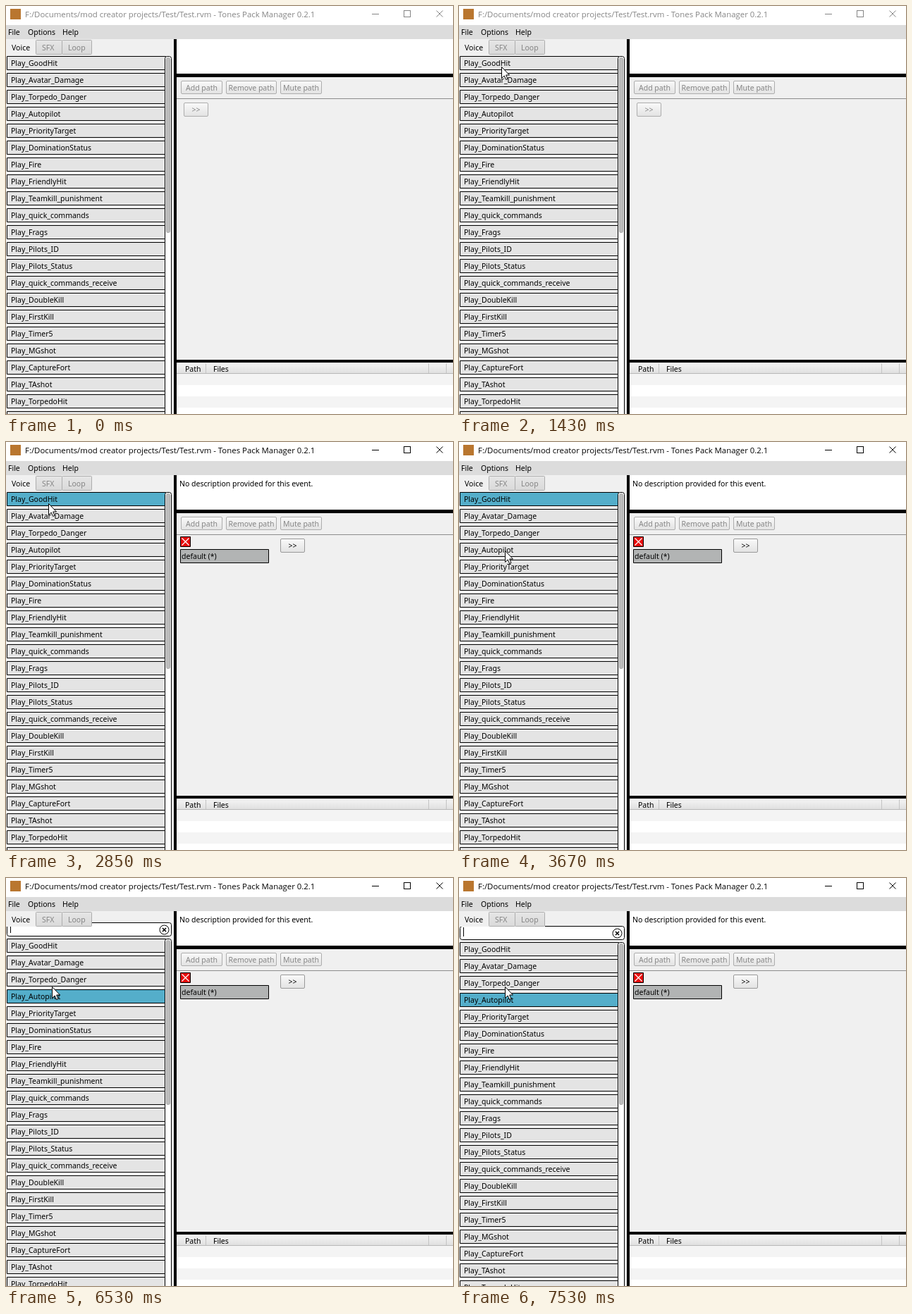
Animation, 634 px wide and 579 px high, one loop 8 s. Source, as an HTML page with a canvas:

```html
<!DOCTYPE html>
<html lang="en">
<head>
<meta charset="utf-8">
<style>
html, body { margin: 0; width: 100%; height: 100%; overflow: hidden; background: #fff; }
canvas { display: block; }
</style>
</head>
<body>
<canvas id="stage" width="634" height="579"></canvas>
<script>
const W = 634, H = 579, LOOP = 8000;
const ctx = document.getElementById('stage').getContext('2d');
const UI = '10.5px "Noto Sans", "Open Sans", sans-serif';
const TITLE = '11.4px "Open Sans", "Noto Sans", sans-serif';
const PANEL = '#f0f0f0', DIM = '#858585';
const EVENTS = ['GoodHit', 'Avatar_Damage', 'Torpedo_Danger', 'Autopilot', 'PriorityTarget',
  'DominationStatus', 'Fire', 'FriendlyHit', 'Teamkill_punishment', 'quick_commands', 'Frags',
  'Pilots_ID', 'Pilots_Status', 'quick_commands_receive', 'DoubleKill', 'FirstKill', 'Timer5',
  'MGshot', 'CaptureFort', 'TAshot', 'TorpedoHit', ''];

// Pointer samples: time, x, y. Each holds until the next one.
const POINTER = [
  [200, 533, 569], [390, 463, 520], [610, 363, 466], [810, 273, 401], [1030, 156, 281],
  [1230, 74, 153], [1430, 60, 86], [1630, 60, 80], [2850, 60, 87], [3050, 63, 106],
  [3270, 64, 128], [3450, 65, 150], [3670, 65, 154]
];

function box(x, y, w, h, color) {
  ctx.fillStyle = color;
  ctx.fillRect(x, y, w, h);
}

function frame(x, y, w, h, fill, stroke, radius = 0) {
  ctx.beginPath();
  ctx.roundRect(x + 0.5, y + 0.5, w - 1, h - 1, radius);
  ctx.fillStyle = fill;
  ctx.fill();
  ctx.lineWidth = 1;
  ctx.strokeStyle = stroke;
  ctx.stroke();
}

function label(text, x, y, color = '#000', font = UI) {
  ctx.font = font;
  ctx.fillStyle = color;
  ctx.fillText(text, x, y);
}

function cross(x, y, size, color, width = 1) {
  ctx.beginPath();
  ctx.moveTo(x, y);
  ctx.lineTo(x + size, y + size);
  ctx.moveTo(x + size, y);
  ctx.lineTo(x, y + size);
  ctx.lineWidth = width;
  ctx.strokeStyle = color;
  ctx.stroke();
}

function shade(y, h, from, to) {
  const g = ctx.createLinearGradient(0, y, 0, y + h);
  g.addColorStop(0, from);
  g.addColorStop(1, to);
  return g;
}

function button(text, x, y, w, h, color = DIM) {
  frame(x, y, w, h, shade(y, h, '#fafafa', '#e2e2e2'), color === DIM ? '#adadad' : '#999', 1.5);
  ctx.textAlign = 'center';
  label(text, x + w / 2, y + h / 2 + 4, color);
  ctx.textAlign = 'left';
}

function drawTitleBar(active) {
  const ink = active ? '#000' : '#858585';
  box(0, 0, W, 27, '#fff');
  box(6, 4, 15, 15, '#b9762f');
  label('F:/Documents/mod creator projects/Test/Test.rvm - Tones Pack Manager 0.2.1', 27, 16, ink, TITLE);
  box(519, 11, 10, 1, ink);
  ctx.lineWidth = 1;
  ctx.strokeStyle = ink;
  ctx.strokeRect(564.5, 6.5, 9, 9);
  cross(610.5, 6.5, 9, ink);
  box(0, 27, W, 20, '#dcdcdc');
  label('File', 3, 41);
  label('Options', 31, 41);
  label('Help', 80, 41);
}

function drawSearch(y, caret) {
  frame(1, y, 234, 20, '#fff', '#000', 3);
  ctx.beginPath();
  ctx.arc(224.5, y + 10.5, 6.5, 0, Math.PI * 2);
  ctx.lineWidth = 1;
  ctx.strokeStyle = '#000';
  ctx.stroke();
  cross(222, y + 8, 5, '#000', 1.6);
  if (caret) box(6, y + 2, 1, 13, '#000');
}

function drawTabs() {
  box(0, 47, 122, 22, PANEL);
  for (const [text, x, w] of [['SFX', 42, 38], ['Loop', 79, 43]]) {
    frame(x, 48, w, 21, shade(48, 21, '#e6e6e6', '#d9d9d9'), '#adadad', 1);
    label(text, x + 9, 63, DIM);
  }
  label('Voice', 8, 63);
}

function drawList(selected, offset, caret) {
  box(0, 47, 238, H - 47, PANEL);
  if (offset) drawSearch(48 + offset, caret);
  drawTabs();
  const top = 71 + offset;
  EVENTS.forEach((name, i) => {
    const y = top + i * 24;
    frame(1, y, 226, 20, i === selected ? '#54aeca' : '#e4e4e4', '#000');
    label('Play_' + name, 7, y + 14);
  });
  frame(225, top, 10, H + 8 - top, '#fff', '#000', 3);
  frame(227, top + 2, 6, 322 - top - 2, '#bcbcbc', '#a6a6a6', 2);
}

function drawDetails(open) {
  box(242, 47, W - 242, 49, '#fff');
  box(242, 101, W - 242, 401, PANEL);
  box(238, 47, 4, H - 47, '#000');
  box(238, 96, W - 238, 5, '#000');
  box(238, 502, W - 238, 4, '#000');
  button('Add path', 248, 106, 59, 19);
  button('Remove path', 312, 106, 72, 19);
  button('Mute path', 389, 106, 59, 19);
  box(242, 131, W - 242, 1, '#8c8c8c');
  if (!open) {
    button('>>', 252, 137, 35, 20);
    return;
  }
  label('No description provided for this event.', 246, 63);
  frame(247, 134, 15, 15, '#e80c0c', '#000');
  cross(249.5, 136.5, 10, '#fff', 1.2);
  frame(247, 152, 126, 20, '#b2b4b4', '#000');
  label('default (*)', 249, 166);
  button('>>', 389, 137, 35, 20, '#000');
}

function drawTable() {
  box(242, 506, W - 242, 16, shade(506, 16, '#f6f6f6', '#dedede'));
  box(242, 521, W - 242, 1, '#b8b8b8');
  for (const x of [283, 599, 624]) box(x, 507, 1, 14, '#c4c4c4');
  label('Path', 254, 519);
  label('Files', 294, 519);
  for (let i = 0; i < 4; i++) box(242, 522 + i * 16, W - 242, 16, i % 2 ? '#fff' : '#f4f4f4');
}

function drawPointer(t) {
  const at = POINTER.findLast(p => t >= p[0]);
  if (!at) return;
  ctx.save();
  ctx.translate(at[1] + 0.5, at[2] + 0.5);
  ctx.fillStyle = '#fff';
  ctx.strokeStyle = '#000';
  ctx.lineWidth = 1;
  const arrow = new Path2D('M0 0V16L3.7 12.5L6.2 18L8.5 17L6.2 11.5H11Z');
  ctx.fill(arrow);
  ctx.stroke(arrow);
  ctx.restore();
}

function draw(t) {
  const selected = t < 2250 ? -1 : t < 4670 ? 0 : 3;
  const offset = t < 6530 ? 0 : t < 6730 ? 15 : 20;
  const caret = t < 7130 || t >= 7530;
  drawTitleBar(t >= 2050);
  drawList(selected, offset, caret);
  drawDetails(selected >= 0);
  drawTable();
  drawPointer(t);
}

const start = performance.now();
function tick() {
  draw((performance.now() - start) % LOOP);
  requestAnimationFrame(tick);
}
tick();
</script>
</body>
</html>
```
